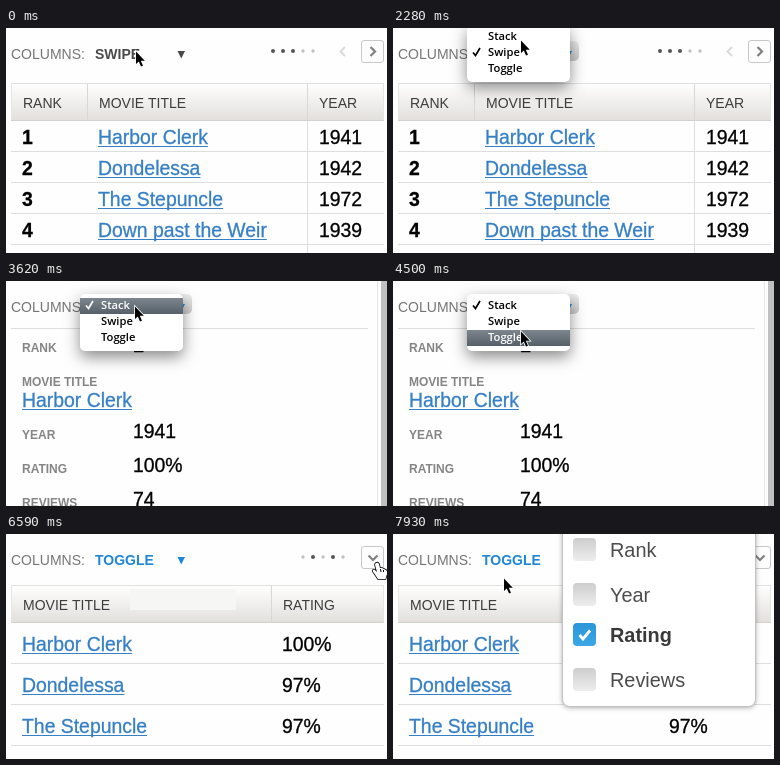
Recreate the animation shown at these times as an HTML page with a canvas. Size 381x225 px, loop 8 s.

```html
<!DOCTYPE html>
<html lang="en">
<head>
<meta charset="utf-8">
<title>Responsive table modes</title>
<style>
  html, body { margin: 0; width: 100%; height: 100%; overflow: hidden; background: #fefefe; }
  canvas { display: block; }
</style>
</head>
<body>
<canvas id="stage" width="381" height="225"></canvas>
<script>
const ctx = document.getElementById('stage').getContext('2d');
const LOOP = 8000;
const SANS = '"Liberation Sans", Arial, sans-serif';
const MENU_FONT = '600 11.2px "Open Sans", "Noto Sans", sans-serif';
const BLUE = '#1f87d8', LINK = '#357fc6', RULE = '#dededc', GREY = '#757575';
const FILMS = [
  ['Harbor Clerk', '1941', '100%'],
  ['Dondelessa', '1942', '97%'],
  ['The Stepuncle', '1972', '97%'],
  ['Down past the Weir', '1939'],
];
const MODES = ['Stack', 'Swipe', 'Toggle'];

// Each entry holds from its start time until the next one.
const VIEWS = [[0, 'Swipe'], [2430, 'Stack'], [5090, 'Toggle']];
const MENUS = [[0, null], [500, { top: 1, checked: 1 }], [2430, null],
  [3620, { top: 17, checked: 0 }], [5090, null]];
const POINTER = [
  [0, 129, 22], [500, 129, 23], [800, 128, 24],
  [1390, 128, 22], [1540, 127, 19], [1690, 126, 17], [1840, 126, 13], [1980, 127, 11],
  [2430, 127, 15], [2570, 127, 18], [2720, 128, 20], [2870, 128, 22], [3020, 128, 24],
  [3910, 128, 27], [4060, 128, 33], [4200, 127, 39], [4350, 127, 45], [4500, 127, 49],
  [5090, 127, 55], [5540, 217, 56], [5690, null], [6590, 366, 28, 'hand'],
  [7480, 335, 18], [7630, 245, 9], [7780, 155, 30], [7930, 110, 43],
];
const at = (keys, t) => keys.findLast(key => key[0] <= t);
const between = (t, from, to) => t >= from && t < to;

function text(str, x, y, size, color, weight = 400) {
  ctx.font = `${weight} ${size}px ${SANS}`;
  ctx.fillStyle = color;
  ctx.fillText(str, x, y);
}

// Table content is set slightly heavier than the labels.
function content(str, x, y, color = '#000', weight = 400) {
  text(str, x, y, 19.4, color, weight);
  ctx.lineWidth = 0.3;
  ctx.strokeStyle = color;
  ctx.strokeText(str, x, y);
}

function rect(x, y, w, h, color) {
  ctx.fillStyle = color;
  ctx.fillRect(x, y, w, h);
}

function link(str, x, y) {
  content(str, x, y, LINK);
  rect(x, y + 2, ctx.measureText(str).width, 1, LINK);
}

function gradient(y, h, top, bottom) {
  const g = ctx.createLinearGradient(0, y, 0, y + h);
  g.addColorStop(0, top);
  g.addColorStop(1, bottom);
  return g;
}

function box(x, y, w, h, radius, fill, stroke) {
  ctx.beginPath();
  ctx.roundRect(x, y, w, h, radius);
  ctx.fillStyle = fill;
  ctx.fill();
  if (stroke) {
    ctx.shadowColor = 'transparent';
    ctx.lineWidth = 1;
    ctx.strokeStyle = stroke;
    ctx.stroke();
  }
}

function shadowBox(x, y, w, h, radius, blur, offset, alpha, stroke) {
  ctx.save();
  ctx.shadowColor = `rgba(0,0,0,${alpha})`;
  ctx.shadowBlur = blur;
  ctx.shadowOffsetY = offset;
  box(x, y, w, h, radius, '#fff', stroke);
  ctx.restore();
}

function line(points, color, width) {
  ctx.beginPath();
  points.forEach(([x, y]) => ctx.lineTo(x, y));
  ctx.lineWidth = width;
  ctx.strokeStyle = color;
  ctx.stroke();
}

function shape(d, x, y, fill, stroke) {
  const path = new Path2D(d);
  ctx.save();
  ctx.translate(x, y);
  if (stroke) {
    ctx.lineWidth = 1.6;
    ctx.strokeStyle = stroke;
    ctx.stroke(path);
  }
  ctx.fillStyle = fill;
  ctx.fill(path);
  ctx.restore();
}

function header(y, columns) {
  rect(5, y, 373, 38, gradient(y, 38, '#fff', '#e2dfdc'));
  rect(5, y, 373, 1, '#e2e1df');
  rect(5, y, 1, 38, '#e5e5e4');
  rect(377, y, 1, 38, '#e5e5e4');
  rect(5, y + 37, 373, 1, '#d4d2cf');
  columns.forEach(([label, x, edge]) => {
    if (edge) rect(edge, y + 1, 1, 36, '#d9d7d4');
    text(label, x, y + 25, 14, '#3c3c3c');
  });
}

function dots(x, active) {
  for (let i = 0; i < 5; i++) {
    const on = active.includes(i);
    ctx.beginPath();
    ctx.arc(x + i * 10, 23, on ? 2 : 1.7, 0, 7);
    ctx.fillStyle = on ? '#555' : '#c2c2c2';
    ctx.fill();
  }
}

function navButton(chevron) {
  box(355.5, 12.5, 22, 22, 2.5, '#fdfdfd', '#c8c8c8');
  line(chevron, '#808080', 2.2);
}

const drawView = {
  Swipe() {
    dots(267, [0, 1, 2]);
    line([[339, 19], [334.5, 23.5], [339, 28]], '#dadada', 2);
    navButton([[364.5, 19], [369, 23.5], [364.5, 28]]);
    header(55, [['RANK', 17], ['MOVIE TITLE', 93, 81], ['YEAR', 313, 301]]);
    FILMS.forEach(([title, year], i) => {
      const y = 116 + i * 31;
      content(i + 1, 16, y, '#000', 700);
      link(title, 92, y);
      content(year, 313, y);
      rect(5, y + 7, 373, 1, RULE);
    });
    rect(301, 93, 1, 132, RULE);
  },

  Stack() {
    rect(5, 47, 357, 1, RULE);
    rect(371, 0, 1, 225, '#e6e6e6');
    rect(375, 0, 6, 225, '#c0c0c0');
    const label = (str, y) => text(str, 16, y, 12, '#858585', 700);
    label('RANK', 71);
    content('1', 127, 71, '#000', 700);
    label('MOVIE TITLE', 105);
    link(FILMS[0][0], 16, 126);
    [['YEAR', '1941'], ['RATING', '100%'], ['REVIEWS', '74']].forEach(([name, value], i) => {
      label(name, 158 + i * 34);
      content(value, 127, 157 + i * 34);
    });
  },

  Toggle(t) {
    dots(297, [1, 3]);
    navButton([[362.5, 21.5], [367, 26], [371.5, 21.5]]);
    header(51, [['MOVIE TITLE', 17], ['RATING', 277, 265]]);
    if (between(t, 5690, 6880)) rect(124, 55, 106, 21, '#f6f6f5');
    FILMS.slice(0, 3).forEach(([title, , rating], i) => {
      const y = 117 + i * 41;
      link(title, 16, y);
      content(rating, 276, y);
      rect(5, y + 12, 373, 1, RULE);
    });
  },
};

function drawSelect(mode, open) {
  if (open) box(78, 13, 108, 20, 5, gradient(13, 20, '#ededed', '#c9c9c9'));
  const color = mode === 'Swipe' && !open ? '#4a4a4a' : BLUE;
  text('COLUMNS:', 5, 31, 14, GREY);
  text(mode.toUpperCase(), 89, 31, 14, color, 700);
  shape('M0 0H7.5L3.75 7.5Z', 171.5, 23, color);
}

function drawMenu({ top, checked }, pointerY, blink) {
  shadowBox(74, top - 4, 103, 57, 5, 15, 6, 0.45);
  const active = blink ? -1 : Math.floor((pointerY - top) / 16);
  MODES.forEach((mode, i) => {
    const y = top + i * 16;
    const color = i === active ? '#fff' : '#000';
    if (i === active) rect(74, y, 103, 16, gradient(y, 16, '#7d868e', '#566069'));
    if (i === checked) line([[80, y + 7.5], [82.5, y + 10.5], [87, y + 3]], color, 1.7);
    ctx.font = MENU_FONT;
    ctx.fillStyle = color;
    ctx.fillText(mode, 95, y + 11);
  });
}

function drawPopup() {
  shadowBox(169.5, -20, 193, 192.5, 7, 5, 1, 0.35, '#c0c0c0');
  [['Rank', 16], ['Year', 61], ['Rating', 101], ['Reviews', 146]].forEach(([name, y]) => {
    const on = name === 'Rating';
    const [top, bottom] = on ? ['#2a96d8', '#3ba7e6'] : ['#cdcdcd', '#ededed'];
    box(180, y - 12, 23, 23, 4, gradient(y - 12, 23, top, bottom));
    if (on) line([[186.5, y], [190, y + 4], [197, y - 4.5]], '#fff', 2.8);
    text(name, 217, y + 7, 19.9, on ? '#3a3a3a' : '#4c4c4c', on ? 700 : 400);
  });
}

function drawPointer(x, y, kind) {
  if (kind === 'hand') {
    shape('M4 1Q6 0 7 2L8 6 10 6 12 7 14 8Q15.5 9 15 12L13.5 17H6L2 11Q0 9 1 8 2 7 5 10L3 3Q3 1.5 4 1Z',
      x, y, '#fff', '#000');
    line([[x + 8.5, y + 7], [x + 9, y + 10]], '#000', 1);
    line([[x + 11.5, y + 8], [x + 11.5, y + 10]], '#000', 1);
  } else {
    shape('M1 1.5V14L3.8 11.4 6 16.6 8 15.8 5.8 10.7H9.8Z', x, y, '#000', '#fff');
  }
}

function draw(t) {
  const [, mode] = at(VIEWS, t);
  const [, menu] = at(MENUS, t);
  const [, x, y, kind] = at(POINTER, t);
  const blink = between(t, 2280, 2430) || between(t, 4940, 5090);
  rect(0, 0, 381, 225, '#fefefe');
  drawView[mode](t);
  drawSelect(mode, menu);
  if (menu) drawMenu(menu, y, blink);
  if (t >= 6880) drawPopup();
  if (x !== null) drawPointer(x, y, kind);
}

const start = performance.now();
function tick() {
  draw((performance.now() - start) % LOOP);
  requestAnimationFrame(tick);
}
tick();
</script>
</body>
</html>
```
